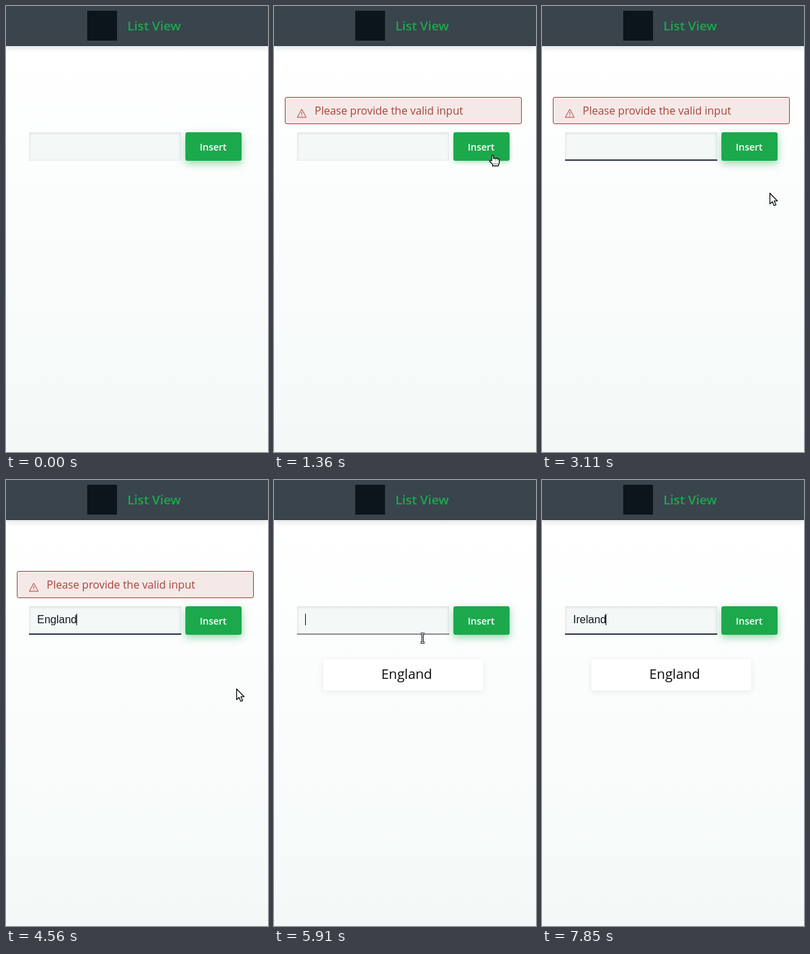
These frames come from a looping animation (387x657 px, 8 s). An HTML page:

```html
<!DOCTYPE html>
<html lang="en">
<head>
<meta charset="utf-8">
<style>
  html, body { margin: 0; width: 100%; height: 100%; overflow: hidden; }
  body { position: relative; background: linear-gradient(#fff 60px, #f4f9f8 657px); }
  div, svg { position: absolute; box-sizing: border-box; }
  svg { left: 0; top: 0; }
  #head { left: 0; top: 0; width: 100%; height: 59px; background: #39444d;
    border-bottom: 1px solid #303a44; box-shadow: 0 2px 9px rgba(57, 68, 77, .2); }
  #logo { left: 120px; top: 7px; width: 44px; height: 44px; background: #0b151b; }
  #error { left: 16px; top: 134px; width: 350px; height: 40px; border-radius: 3px;
    border: 1px solid #96463d; background: #f5e9e7; }
  #input { left: 34px; top: 186px; width: 225px; height: 42px; border-radius: 2px;
    background: #f4f8f7; box-shadow: inset 0 1px 4px rgba(57, 68, 77, .17); }
  #line { left: 0; bottom: 0; width: 100%; height: 2px; background: #2c3748; }
  #button { left: 265px; top: 186px; width: 83px; height: 42px; border-radius: 3px;
    background: #1ba94c; box-shadow: 0 4px 12px rgba(27, 169, 76, .45); }
  #button.hover { box-shadow: 0 2px 6px rgba(27, 169, 76, .35); }
  #card { left: 73px; top: 264px; width: 236px; height: 46px; border-radius: 3px;
    background: #fff; box-shadow: 0 2px 9px rgba(57, 68, 77, .1); }
  text { font-family: "Open Sans", sans-serif; white-space: pre; }
  #typed { font: 16px "Liberation Sans", Arial, sans-serif; }
</style>
</head>
<body>
<div id="head"></div>
<div id="logo"></div>
<div id="error"></div>
<div id="input"><div id="line"></div></div>
<div id="button"></div>
<div id="card"></div>

<svg width="387" height="657">
  <defs><path id="stem" d="M-3 -6.5 H3 M0 -6.5 V6.5 M-3 6.5 H3"/></defs>
  <text x="179.2" y="36" font-size="18.72" font-weight="600" fill="#1ba94c">List View</text>
  <text x="286.3" y="213" font-size="14" font-weight="600" fill="#fff">Insert</text>
  <g id="message">
    <path d="M41 152 L47.6 164 H34.4 Z M41 156 V160.3 M41 161.3 V162.3"
      fill="none" stroke="#a8433a"/>
    <text x="60" y="160" font-size="16" fill="#a8433a">Please provide the valid input</text>
  </g>
  <text id="item" x="158.5" y="293" font-size="20" fill="#0a0a0a">England</text>
  <text id="typed" x="46" y="211" fill="#10161e"></text>
  <rect id="caret" y="197" width="1" height="17" fill="#111"/>
  <g id="mouse" stroke-linejoin="round">
    <path id="arrow" d="M.6 .8 V16.6 L4.2 13.2 L6.8 19 L9.6 17.8 L7 12.2 H11.8 Z"
      fill="#fff" stroke="#111" stroke-width="1.3"/>
    <g id="hand" transform="translate(-5.3 0)">
      <path d="M4 9 V1.8 Q5.2 0 6.5 1.8 V5.5 H12 Q15 6 15 8.5 V12.5 L13.5 16.5 H5 V14
        L1 10 Q0 7.5 4 9 Z" fill="#fff" stroke="#111" stroke-width="1.3"/>
      <path d="M6 13.5 H13 M9.3 7 V9.5 M12 7.5 V9.5" stroke="#111" stroke-dasharray="1 1"/>
    </g>
    <g id="beam">
      <use href="#stem" stroke="#111" stroke-width="3"/>
      <use href="#stem" stroke="#fff"/>
    </g>
  </g>
</svg>

<script>
const $ = id => document.getElementById(id);
const show = (id, on) => { $(id).style.display = on ? "" : "none"; };
const between = (t, a, b) => t >= a && t < b;
const ramp = (t, a, b) => Math.min(1, Math.max(0, (t - a) / (b - a)));

const LOOP = 8000, STEP = 93;

// Each stroke visits its points evenly in a number of steps, then rests.
const strokes = [
  { start: 400, steps: 8, points: [[366, 505], [323, 219]] },
  { start: 1760, steps: 9, points: [[289, 227], [186, 250], [60, 170], [150, 206]] },
  { start: 2610, steps: 1, points: [[150, 206], [336, 275]] },
  { start: 4560, steps: 6, points: [[340, 307], [300, 215], [277, 223]] },
  { start: 5130, steps: 2, points: [[277, 223], [207, 237]] },
  { start: 5510, steps: 1, points: [[203, 230], [200, 226]] },
  { start: 5910, steps: 2, points: [[219.5, 233], [375, 280]] }
];

// One letter per step, with a pause before one of them.
const words = [
  { text: "England", start: 3400, pauseAt: 2, pause: 120, end: 5035 },
  { text: "Ireland", start: 6870, pauseAt: 4, pause: 418, end: LOOP }
];

function pointer(t) {
  const { start, steps, points } = strokes.findLast(s => s.start <= t);
  const legs = points.length - 1;
  const at = Math.min(1, Math.floor((t - start) / STEP) / steps) * legs;
  const i = Math.min(legs - 1, Math.floor(at));
  return points[i].map((v, axis) => v + (points[i + 1][axis] - v) * (at - i));
}

function drawPointer(t) {
  const visible = between(t, 400, 6080);
  show("mouse", visible);
  if (!visible) return $("button").classList.remove("hover");
  const [x, y] = pointer(t);
  const hand = between(x, 265, 348) && between(y, 186, 228);
  const beam = between(x, 34, 259) && between(y, 186, 235);
  show("hand", hand);
  show("beam", beam);
  show("arrow", !hand && !beam);
  $("button").classList.toggle("hover", hand);
  $("mouse").setAttribute("transform", `translate(${x} ${y})`);
}

function typedText(t) {
  const { text, start, pauseAt, pause } = words.find(w => t < w.end);
  const pressed = i => start + i * STEP + (i < pauseAt ? 0 : pause) <= t;
  return [...text].filter((c, i) => pressed(i)).join("");
}

function draw(t) {
  const error = between(t, 1360, 5035), added = t >= 5035;
  show("error", error);
  show("message", error);
  show("card", added);
  show("item", added);

  const typed = typedText(t);
  $("typed").textContent = typed;
  const width = typed ? $("typed").getComputedTextLength() : 0;
  $("caret").setAttribute("x", Math.floor(46 + width));
  show("caret", between(t, 2520, 3110) || between(t, 3400, 4940) ||
    between(t, 5900, 6370) || t >= 6870);
  $("line").style.opacity =
    ramp(t, 2560, 2720) - ramp(t, 4940, 5180) + ramp(t, 5800, 6020);

  drawPointer(t);
}

let begin;
function tick(now) {
  begin ??= now;
  draw((now - begin) % LOOP);
  requestAnimationFrame(tick);
}
draw(0);
requestAnimationFrame(tick);
</script>
</body>
</html>
```
